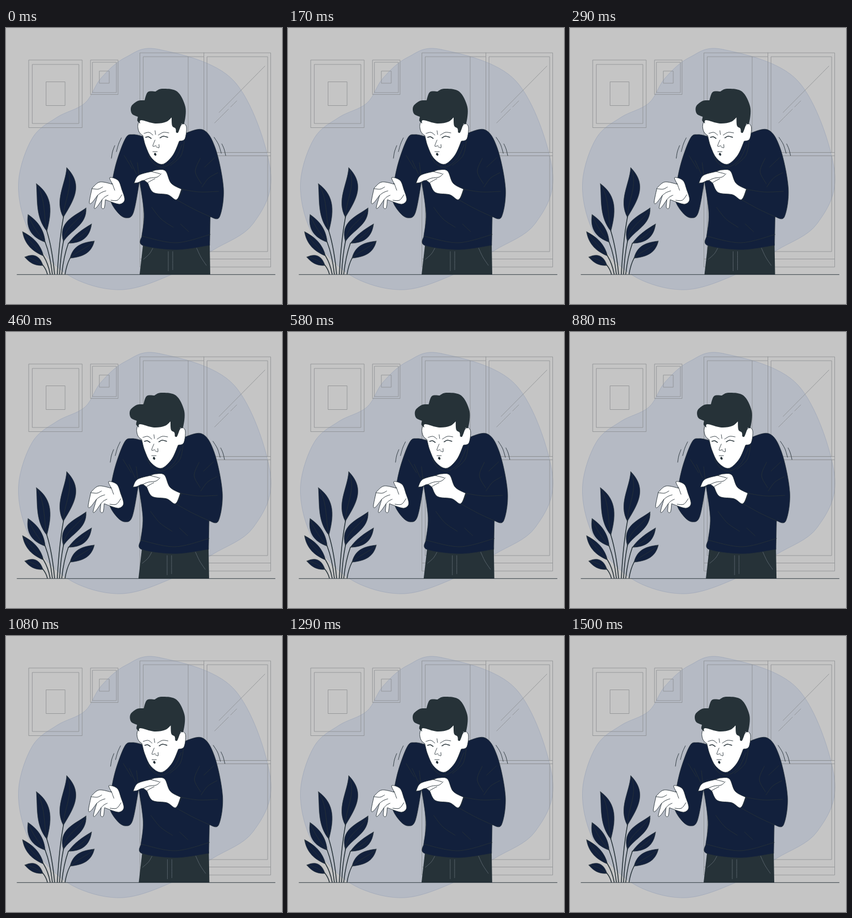
These frames come from a looping animation (500x500 px, 1.54 s). An HTML page:

```html
<!DOCTYPE html>
<html lang="en">
<head>
<meta charset="utf-8">
<title>Shivering man</title>
<style>
  html, body { margin: 0; width: 100%; height: 100%; overflow: hidden; background: #c5c5c5; }
  svg { display: block; width: 100vw; height: 100vh; }
  path { stroke-linecap: round; stroke-linejoin: round; }
  .blob { fill: #b5bac4; stroke: #98a2b5; stroke-width: .6; }
  .room { fill: none; stroke: #8b8d90; stroke-width: .8; }
  .navy { fill: #12203c; stroke: #263238; stroke-width: .7; }
  .dark { fill: #263238; }
  .skin { fill: #fff; stroke: #263238; stroke-width: .9; }
  .line { fill: none; stroke: #263238; stroke-width: .9; }
  .bold { fill: none; stroke: #263238; stroke-width: 1.5; }
  .seam { fill: none; stroke: #76808a; stroke-width: .6; }
</style>
</head>
<body>
<svg viewBox="0 0 500 500"><g id="scene"></g><g id="man"></g><g id="front"></g></svg>
<script>
  const [scene, man, front] = ['scene', 'man', 'front'].map(id => document.getElementById(id));

  function add(parent, style, d) {
    const path = document.createElementNS('http://www.w3.org/2000/svg', 'path');
    path.setAttribute('class', style);
    path.setAttribute('d', d);
    parent.append(path);
  }

  // Smooth curve through the points; a run that ends where it starts is periodic.
  function spline(pts) {
    const n = pts.length - 1;
    const loop = n > 2 && String(pts[0]) === String(pts[n]);
    const at = i => loop ? pts[(i + n) % n] : pts[Math.max(0, Math.min(n, i))];
    let d = '';
    for (let i = 0; i < n; i++) {
      const [a, b, c, e] = [at(i - 1), at(i), at(i + 1), at(i + 2)];
      const c1 = b.map((v, k) => v + (c[k] - a[k]) / 6);
      const c2 = c.map((v, k) => v - (e[k] - b[k]) / 6);
      d += `C${c1} ${c2} ${c}`;
    }
    return d;
  }

  // "/" marks a corner, ";" starts a new stroke.
  function trace(text) {
    return text.split(';').map(stroke => {
      let last, d = '';
      for (const run of stroke.split('/')) {
        const pts = run.trim().split(' ').map(p => p.split(',').map(Number));
        if (last) pts.unshift(last);
        else d = 'M' + pts[0];
        d += spline(pts);
        last = pts[pts.length - 1];
      }
      return d;
    }).join('');
  }

  const draw = (parent, style, text) => add(parent, style, trace(text));
  const box = (l, t, r, b) => add(scene, 'room', `M${l} ${t}H${r}V${b}H${l}Z`);

  // Blade from base to tip; low and high bend its midrib sideways.
  function leaf(bx, by, tx, ty, width, low, high, root) {
    const dx = tx - bx, dy = ty - by, len = Math.hypot(dx, dy);
    const ctrl = (f, off) => [bx + dx * f - dy / len * off, by + dy * f + dx / len * off];
    const side = w => [ctrl(1 / 3, low + w), ctrl(2 / 3, high + w)];
    const [l1, l2] = side(-width), [r1, r2] = side(width), [m1, m2] = side(0);
    add(scene, 'bold', `M${bx} ${by}Q${root + (bx - root) * .3} ${by + (447 - by) * .4} ${root} 446`);
    add(scene, 'navy', `M${bx} ${by}C${l1} ${l2} ${tx} ${ty}C${r2} ${r1} ${bx} ${by}Z`);
    add(scene, 'line', `M${bx} ${by}C${m1} ${m2} ${tx} ${ty}`);
  }

  // Room
  draw(scene, 'blob', '278,39 217,53 172,91 143,136 92,162 48,199 23,275 34,350 71,411 130,457 212,474 299,447 374,403 448,354 479,258 413,96 278,39');
  box(41.5, 58, 138, 180.5);
  box(48, 66, 132, 173);
  box(73, 97.5, 107, 140.5);
  box(153.5, 58, 203, 120.5);
  box(157, 62, 200, 117);
  box(169.5, 78, 187, 100);
  box(243, 45, 479.5, 433);
  box(249, 52, 330, 405);
  box(364.5, 52, 474, 225.5);
  box(364.5, 231.5, 474, 405);
  add(scene, 'room', 'M358.5 45V418M358.5 225.5H479M358.5 231.5H479M243 418.5H479M330 52H358');
  draw(scene, 'room', '469,69 386,153;418,132 407,143;403,147 378,172');

  // Plant
  leaf(104, 343, 110, 253, 17, -2, 17, 93);
  leaf(74, 368, 55, 282, 15, 0, 11, 88);
  leaf(104, 387, 145, 326, 14, -15, 5, 97);
  leaf(113, 390, 155, 355, 10, 5, 7, 101);
  leaf(116, 417, 160, 386, 13, -3, 3, 107);
  leaf(71, 388, 40, 338, 13, -3, -4, 84);
  leaf(68, 413, 30, 369, 10, 0, -2, 80);
  leaf(67, 430, 34, 415, 10, 3, 4, 75);

  // Trousers
  add(man, 'dark', 'M249 386L242 447H370L369 390Z');
  draw(man, 'seam', '267,397 260,409 249,419;345,398 353,415 363,430;294,405 294,440;302,405 302,438');

  // Sweater
  draw(man, 'navy', '247,196 230,193 217,199 201,240 192,280 189,311 203,335 218,344 231,334 242,277 / 250,336 246,377 / 248,394 308,402 369,394 / 370,342 / 387,342 394,290 379,217 356,184 317,194 / 285,248 / 247,196');
  draw(man, 'line', '246,377 308,389 370,374;214,231 229,255;225,240 236,264;242,277 238,244;264,325 281,346 303,361;316,355 331,369');
  draw(man, 'line', '378,235 360,252;352,236 343,260 354,282;384,262 367,272 355,288;317,292 350,297 385,296;309,311 340,328 370,342;313,308 320,292');
  draw(man, 'line', '258,231 268,246 285,252 306,238 319,211;323,205 317,231 298,249');

  // Head
  draw(man, 'skin', '246,160 239,175 241,188 248,195 / 253,214 264,236 283,247 302,231 314,205 / 324,201 327,180 321,173 314,180 / 305,160');
  draw(man, 'dark', '251,131 239,132 227,142 228,155 239,161 / 238,168 243,173 / 245,167 270,173 290,170 300,162 / 301,177 307,182 308,189 / 312,189 318,173 / 323,172 325,143 310,115 283,110 271,115 / 257,116 251,131');
  draw(man, 'line', '250,191 259,189 266,194;276,194 285,189 295,190;270,186 271,193;270,203 266,214 272,213;272,215 277,217 277,211;266,224 274,224');
  draw(man, 'bold', '253,198 258,197 263,200;279,199 285,196 293,198');
  draw(man, 'dark', '270,226 272.5,229 271,231.5 268,229 270,226');

  // Hands
  draw(man, 'skin', '193,316 180,311 / 178,326 173,325 174,311 / 164,325 160,325 166,303 / 155,317 151,315 156,290 / 170,279 193,283 / 188,271 203,276 210,293 215,311 207,319 193,316');
  draw(man, 'line', '156,291 167,292 175,288;166,303 173,298 181,295;174,311 179,306 185,303;193,283 197,294;190,312 202,312 210,302');
  draw(man, 'skin', '232,281 240,267 263,260 274,257 289,259 299,281 318,292 / 309,311 293,302 267,298 257,281 / 249,276 239,280 232,281');
  draw(man, 'line', '248,277 260,272 274,270 281,264;257,280 264,276 270,273;263,260 279,264');

  // Shiver marks
  draw(man, 'line', '209,199 204,210 200,224;197,213 193,224 191,236;377,198 385,211 390,227;391,210 395,219 398,231');

  // Floor
  add(front, 'line', 'M20 446.7H487.5');

  const LOOP = 1540, STEPS = 37, SHAKE = 1500, LEAD = 25;
  const offsets = [0, -1, 2, -4, 4, -4, 4, -4, 2, -1, 0];

  // Linear moves between equally spaced offsets.
  function shakeAt(ms) {
    const pos = (ms % SHAKE) / SHAKE * 10, i = Math.floor(pos);
    return offsets[i] + (offsets[i + 1] - offsets[i]) * (pos - i);
  }

  function tick(now) {
    const step = Math.floor((now % LOOP) / LOOP * STEPS + 0.1) % STEPS;
    const x = shakeAt(step * LOOP / STEPS + LEAD) - shakeAt(LEAD);
    man.setAttribute('transform', `translate(${x.toFixed(2)} 0)`);
    requestAnimationFrame(tick);
  }
  tick(0);
</script>
</body>
</html>
```
